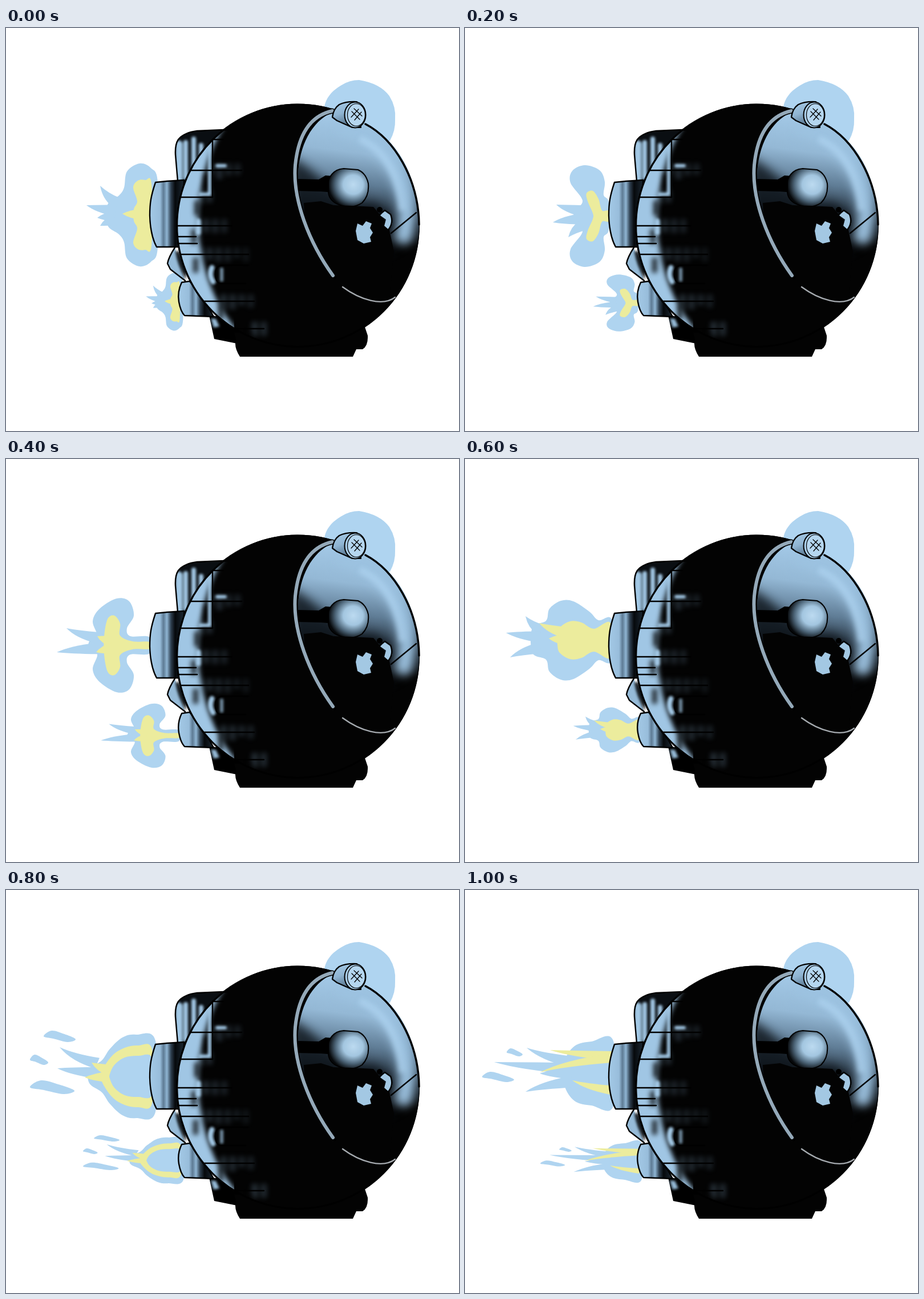
An HTML page that plays this animation: 794 px wide and 705 px high, repeating every 1200 ms.

```html
<!DOCTYPE html>
<html lang="en">
<head>
<meta charset="utf-8">
<title>Round rocket</title>
<style>
html, body { margin: 0; width: 100%; height: 100%; overflow: hidden; background: #fff; }
svg { display: block; width: 100vw; height: 100vh; }
.ink { fill: none; stroke: #000; stroke-width: 2.4; stroke-linecap: round; stroke-linejoin: round; }
.blue { fill: #afd4f0; }
.yellow { fill: #ecec9d; }
</style>
</head>
<body>
<svg viewBox="0 0 794 705" xmlns="http://www.w3.org/2000/svg">
<defs>
  <filter id="b2" x="-50%" y="-50%" width="200%" height="200%" color-interpolation-filters="sRGB"><feGaussianBlur stdDeviation="2"/></filter>
  <filter id="b4" x="-50%" y="-50%" width="200%" height="200%" color-interpolation-filters="sRGB"><feGaussianBlur stdDeviation="4"/></filter>
  <filter id="b9" x="-50%" y="-50%" width="200%" height="200%" color-interpolation-filters="sRGB"><feGaussianBlur stdDeviation="9"/></filter>
  <clipPath id="hullClip"><circle cx="511.500" cy="345.700" r="212"/></clipPath>
  <clipPath id="pane"><path d="M572 147C532 166 511 212 512 268C513 325 543 385 578 437C612 470 650 484 683 471C710 438 724 390 724 340C722 262 688 195 630 168C605 152 588 145 572 147Z"/></clipPath>
  <path id="boxShape" d="M382 178L335 180Q312 183 302 195Q296 204 297 222L301 268H318L382 195Z"/>
  <clipPath id="box"><use href="#boxShape"/></clipPath>
  <linearGradient id="pipe">
    <stop offset="0" stop-color="#a3c9e6"/><stop offset=".3" stop-color="#98bddb"/>
    <stop offset=".4" stop-color="#5d7a93"/><stop offset=".5" stop-color="#8fb5d3"/>
    <stop offset=".62" stop-color="#2e3f4f"/><stop offset=".74" stop-color="#06090c"/><stop offset="1" stop-color="#1b2732"/>
  </linearGradient>
  <linearGradient id="glass" gradientUnits="userSpaceOnUse" x1="615" y1="150" x2="585" y2="390">
    <stop offset="0" stop-color="#a4cae8"/><stop offset=".28" stop-color="#94b8d5"/>
    <stop offset=".5" stop-color="#5f7c95"/><stop offset=".75" stop-color="#18212a"/><stop offset=".9" stop-color="#030303"/>
  </linearGradient>
  <radialGradient id="helmet" cx=".62" cy=".42" r=".62">
    <stop offset="0" stop-color="#bcdaf0"/><stop offset=".4" stop-color="#a3c6e0"/>
    <stop offset=".72" stop-color="#4d6578"/><stop offset="1" stop-color="#06080a"/>
  </radialGradient>
  <linearGradient id="lampBody" x2=".4" y2="1">
    <stop offset="0" stop-color="#a9cde9"/><stop offset=".5" stop-color="#8fb4d2"/><stop offset="1" stop-color="#4f6b83"/>
  </linearGradient>
</defs>

<path class="blue" d="M557 145C559 121 573 109 588 100Q602 91 619 91Q656 97 672 119Q684 138 682 160Q683 179 673 197L620 215Z"/>
<g id="flames"></g>

<!-- rear box -->
<use href="#boxShape" fill="#0a0e12"/>
<g clip-path="url(#box)" fill="none" stroke="#a3c9e6" filter="url(#b2)" stroke-linecap="round">
  <path stroke-width="13" d="M303 203V268"/>
  <path stroke-width="8" d="M315 200V262M329 194V245M342 205V225"/>
</g>
<use href="#boxShape" class="ink"/>

<!-- fin and foot -->
<path class="ink" style="fill:#96bbd8" d="M314 442L288 422L283 412Q285 401 296 384"/>
<path d="M297 391Q300 414 315 440L318 420L303 390Z" fill="#10161b" filter="url(#b2)"/>
<path d="M356 503L365 544L405 552L420 535L380 505Z"/>
<path d="M359 508L364 524L374 522L368 509Z" fill="#96bbd8" filter="url(#b2)"/>

<!-- nozzles -->
<g class="ink">
  <path fill="url(#pipe)" d="M312 266L282 268L262 270C254 294 252 306 252 328Q253 363 264 383H306Z"/>
  <path fill="url(#pipe)" d="M322 443L308 445Q300 461 303 479Q306 496 313 503L364 505L350 480Z"/>
</g>

<!-- hull -->
<circle cx="511.500" cy="345.700" r="213.300" fill="#030303"/>
<path fill="#030303" d="M400 533L403 545Q399 558 410 575H608L614 562H625Q635 556 634 538L629 523Z"/>
<g clip-path="url(#hullClip)">
  <path fill="#a0c6e4" d="M290 180H400V545H290Z"/>
  <ellipse cx="540" cy="335" rx="203" ry="260" fill="#030303" filter="url(#b4)"/>
  <g id="drips" fill="none" filter="url(#b4)"></g>
  <g fill="none" stroke="#a3c9e6" stroke-linecap="round" filter="url(#b2)">
    <path stroke-width="6" d="M357 208V289M332 212V240M340 291H357M370 241H384"/>
    <path stroke-width="9" d="M361 419Q355 432 363 444M337 338V358"/>
    <path stroke-width="6" opacity=".7" d="M378 422V441"/>
  </g>
  <path id="seams" class="ink"/>
  <path class="ink" d="M362 195H380M362 195V296M300 365H333M300 377H335M424 415H376Q367 418 367 431Q368 446 376 447H420"/>
</g>
<circle class="ink" style="stroke-width:3" cx="511.500" cy="345.700" r="211.800"/>

<!-- window -->
<g clip-path="url(#pane)">
  <rect x="490" y="130" width="240" height="360" fill="url(#glass)"/>
  <path filter="url(#b9)" fill="#0a0f14" opacity=".8" d="M500 225L530 245L600 305L650 305L682 335V375L665 490H500Z"/>
  <path filter="url(#b9)" fill="none" stroke="#9cc2e0" stroke-width="30" d="M585 170C650 184 691 238 701 300Q706 347 692 376"/>
  <path filter="url(#b4)" fill="none" stroke="#aed3f0" stroke-width="12" opacity=".7" d="M620 194C665 213 689 259 695 319"/>
  <path filter="url(#b9)" fill="#030303" d="M520 405L650 395L680 402L724 375V490H520Z"/>

  <path d="M511 264L548 265L560 258L574 259L586 277L577 288L552 286L511 285Z"/>
  <path d="M565 267Q572 247 592 246L617 248Q631 254 635 272Q637 293 624 306Q607 317 586 310Q567 304 565 288Z" fill="url(#helmet)" stroke="#000" stroke-width="2"/>
  <path fill="#030303" d="M522 306L552 303L574 310L607 311L644 313L670 344L680 391L672 475H570L525 365Z"/>
  <path fill="#a3c8e3" d="M616 342L625 346L631 338L641 342L638 350L643 358L638 366L640 374L627 377L616 371L613 355Z"/>
  <path fill="#a3c8e3" d="M656 328L664 319L674 327L677 342L670 352L663 346L666 335Z"/>
  <path class="ink" d="M655 326L664 319L674 326Q680 341 670 353M675 359L719 323"/>
  <circle cx="655" cy="318" r="5"/>
</g>
<g fill="none" stroke-linecap="round">
  <path id="rim" stroke="#000" stroke-width="9" d="M572 145C531 154 512 190 507 240C502 300 531 375 575 435"/>
  <path stroke="#94a9b9" stroke-width="6" d="M572 145C531 154 512 190 507 240C502 300 531 375 573 433"/>
  <path stroke="#a6abb0" stroke-width="2.400" d="M590 453C620 475 660 488 682 471"/>
</g>
<path class="ink" style="stroke-width:3.500" d="M630 168C680 194 723 263 724 344"/>

<!-- lamp -->
<path d="M572 156Q574 141 584 134Q596 128 615 129L622 174L607 174L580 162Z" fill="url(#lampBody)" stroke="#000" stroke-width="2.200" stroke-linejoin="round"/>
<ellipse cx="612" cy="152" rx="18.500" ry="22.500" fill="#a9cde9" stroke="#000" stroke-width="2"/>
<ellipse cx="614" cy="152" rx="15.500" ry="19.500" fill="#b5d6ef" stroke="#000" stroke-width="1.200"/>
<path class="ink" style="stroke-width:1.300" d="M606 146L620 160M610 141L624 154M605 156L618 142M611 161L623 147"/>
</svg>

<script>
const STEP = 200;
const HULL = { x: 511.5, y: 345.7, r: 211 };

// Flame space: x runs backwards from the nozzle mouth, y down from the axis.
// half: upper or lower edge, mirrored; tips: tongue ends; drops: x, y, length, height.
// axis: height at the large and small nozzle; small: scale of the lower flame.
const poses = [
  { axis: [327, 479], small: [.52, .56],
    blue: { half: "-14,57 -2,82 18,90 40,76 45,48 54,34 74,18", tips: "87,-51 111,-17 92,5 87,19" },
    yellow: { half: "-3,54 8,61 21,60 29,48 22,24 28,10", tips: "48,-2" } },
  { axis: [329, 481], small: [.8, .56],
    blue: { half: "0,24 9,37 7,60 16,80 42,89 64,79 67,58 46,27 60,8", tips: "92,-20 98,11 71,37" },
    yellow: { half: "0,9 12,10 18,30 28,44 39,40 37,26 28,5" } },
  { axis: [326, 484], small: [.84, .68],
    blue: { half: "0,14 34,16 40,30 28,52 36,77 58,82 88,64 100,42 92,16 106,7", tips: "146,-30 163,12" },
    yellow: { half: "0,6 30,7 52,17 52,38 62,52 74,46 80,16", tips: "92,-16 94,12" } },
  { axis: [317, 474], small: [.63, .56],
    blue: { half: "-5,36 18,35 34,50 62,68 84,69 104,55 110,34 134,22", tips: "146,-42 180,-13 173,30" },
    yellow: { half: "-3,30 26,20 48,31 68,33 86,22 90,8", tips: "122,-30 105,-3" } },
  { axis: [326, 473], small: [.8, .55],
    blue: { half: "-10,62 24,73 48,68 70,48 84,28 106,12", tips: "158,-51 162,-14",
      drops: "158,-70,28,10 194,-29,16,9 171,19,39,12" },
    yellow: { half: "-4,47 20,54 44,50 66,36 84,9", tips: "102,-24 114,2" },
    core: { half: "-4,32 20,36 44,33 62,20 70,4" } },
  { axis: [321, 475], small: [.77, .57],
    blue: { half: "-8,57 30,56 60,48 78,20", tips: "144,-45 201,-20 121,0 146,32",
      drops: "165,-37,14,7 194,6,28,9" },
    yellow: { streaks: "-4,-31,103,-41 -4,-27,121,-2 -4,29,64,12" } }
];

const read = text => text ? text.split(" ").map(s => s.split(",").map(Number)) : [];
const mix = (a, b, t) => a + (b - a) * t;

// Smooth closed curve through the points.
function loop(p) {
  const at = i => p[(i + p.length) % p.length];
  return p.reduce((d, b, i) => {
    const a = at(i - 1), c = at(i + 1), e = at(i + 2);
    const out = b.map((v, k) => v + (c[k] - a[k]) / 6);
    const into = c.map((v, k) => v - (e[k] - b[k]) / 6);
    return d + "C" + [out, into, c].join(" ");
  }, "M" + p[0]) + "Z";
}

function mirrored(half) {
  return loop([...half, ...half.map(([x, y]) => [x, -y]).reverse()]);
}

// Tapered tongue that curls towards its tip.
function tongue(x0, y0, x1, y1, w = 10) {
  const n = Math.hypot(x1 - x0, y1 - y0);
  const nx = -(y1 - y0) / n * w, ny = (x1 - x0) / n * w;
  const cx = mix(x0, x1, .65), cy = mix(y0, y1, .35);
  return `M${x0 + nx} ${y0 + ny}Q${cx + nx * .7} ${cy + ny * .7} ${x1} ${y1}` +
    `Q${cx - nx * .7} ${cy - ny * .7} ${x0 - nx} ${y0 - ny}Z`;
}

// Leaf with one slightly raised end.
function drop(x, y, w, h) {
  return loop([[x - w, y + h * .5], [x - w * .3, y - h * .4], [x + w * .5, y - h],
    [x + w, y], [x + w * .4, y + h * .4], [x - w * .5, y + h]]);
}

function layer(part, name) {
  if (!part) return "";
  const half = read(part.half);
  const end = half.length ? half[half.length - 1][0] - 14 : 0;
  const d = [
    half.length ? mirrored(half) : "",
    ...read(part.tips).map(([x, y]) => tongue(end, y * .45, x, y)),
    ...read(part.drops).map(v => drop(...v)),
    ...read(part.streaks).map(v => tongue(...v, 8))
  ];
  return d.map(s => s && `<path class="${name}" d="${s}"/>`).join("");
}

function flames({ axis, small, blue, yellow, core }) {
  const art = layer(blue, "blue") + layer(yellow, "yellow") + layer(core, "blue");
  const place = (x, y, sx, sy) => `<g transform="translate(${x} ${y}) scale(${-sx} ${sy})">${art}</g>`;
  return place(252, axis[0], 1, 1) + place(303, axis[1], ...small);
}

// Seams run from the hull edge; soft drips hang around them.
function dressHull() {
  const ends = { 249: 413, 296: 362, 346: 395, 396: 425, 478: 435, 526: 452 };
  let seed = 7, seams = "", drips = "";
  const random = () => (seed = seed * 16807 % 2147483647) / 2147483647;
  const bar = (color, x, y, w, h, o) =>
    drips += `<path stroke="${color}" stroke-width="${w}" opacity="${o}" d="M${x} ${y}v${h}"/>`;
  for (const [key, end] of Object.entries(ends)) {
    const y = +key;
    const edge = HULL.x - Math.sqrt(HULL.r ** 2 - (y - HULL.y) ** 2);
    seams += `M${edge} ${y}H${end}`;
    for (let x = edge + 34; x < end; x += 16) {
      bar("#86a9c5", x, y - 12, 11, 18 + random() * 10, .32 * (1 - (x - edge) / 170));
    }
    bar("#030303", edge + 22 + random() * 8, y + 6, 9, 26, .8);
  }
  document.getElementById("seams").setAttribute("d", seams);
  document.getElementById("drips").innerHTML = drips;
}

const pictures = poses.map(flames);
const stage = document.getElementById("flames");
const start = performance.now();
let shown = -1;

function draw(now) {
  const i = Math.floor(Math.max(0, now - start) / STEP) % pictures.length;
  if (i !== shown) {
    stage.innerHTML = pictures[i];
    shown = i;
  }
  requestAnimationFrame(draw);
}
dressHull();
draw(start);
</script>
</body>
</html>
```
